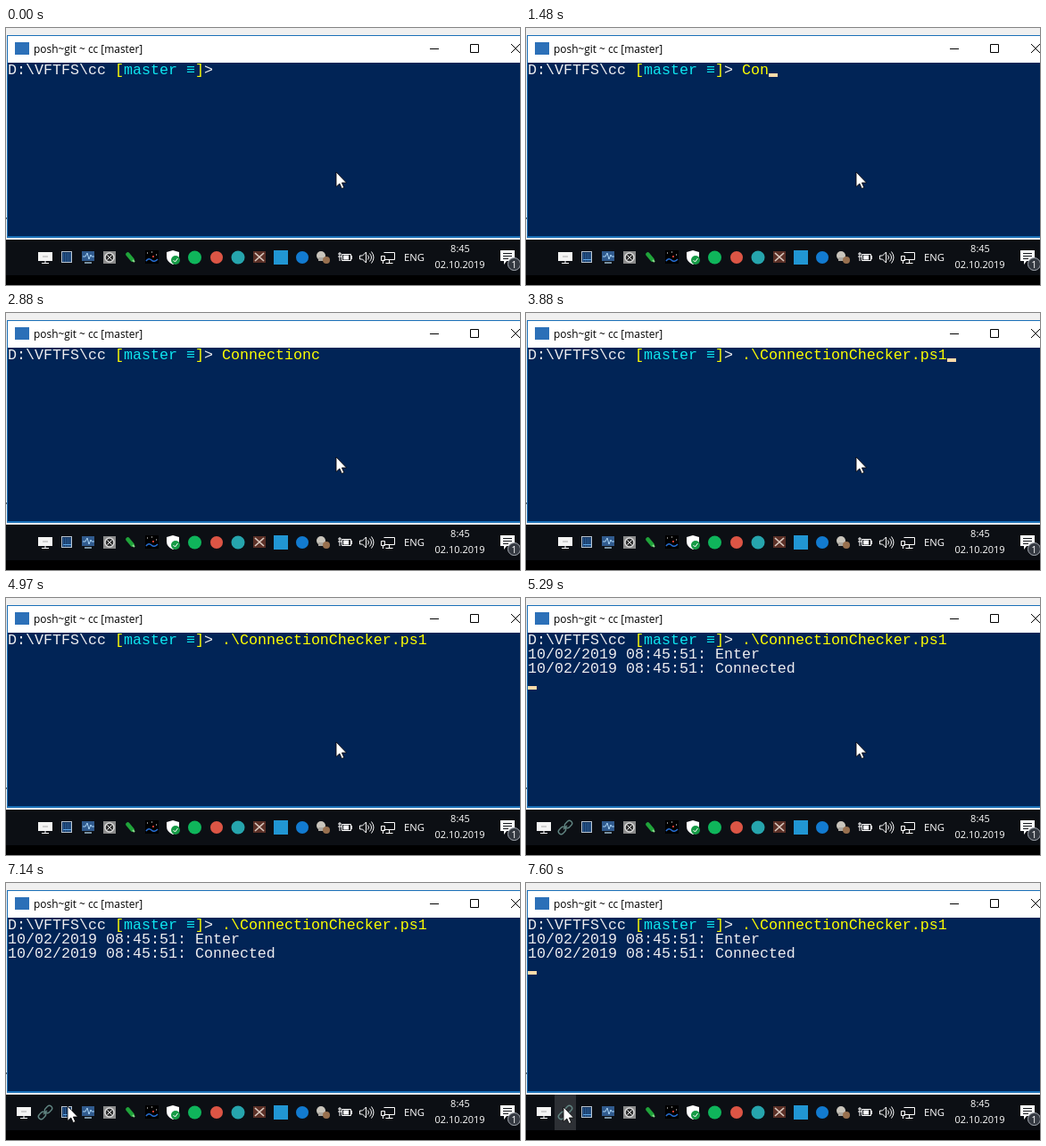
Write an HTML page that moves like this. It is 576 px wide and 289 px high and loops after 8 s.

```html
<!DOCTYPE html>
<html lang="en">
<head>
<meta charset="utf-8">
<title>Connection checker</title>
<style>
  html, body { margin: 0; width: 100%; height: 100%; overflow: hidden; background: #000; }
  svg { display: block; }
  rect { shape-rendering: crispEdges; }
  .term { font: 16.667px "Liberation Mono", monospace; fill: #eeedf0; white-space: pre; }
  .ui { font: 11px "Open Sans", sans-serif; }
  .yellow { fill: #ff0; }
  .cyan { fill: #0ee6f0; }
  .line { fill: none; stroke: #fff; }
</style>
</head>
<body>
<svg width="576" height="289" viewBox="0 0 576 289">
  <!-- window -->
  <rect width="576" height="238" fill="#f0f0f0"/>
  <rect y="213" width="1" height="2" fill="#666"/>
  <rect x="1" y="8" width="575" height="228" fill="#1a70b8"/>
  <rect x="2" y="9" width="574" height="30" fill="#fff"/>
  <rect x="2" y="39" width="574" height="195" fill="#012456"/>
  <rect x="10" y="16" width="16" height="14" fill="#2c70b8"/>
  <text class="ui" x="31" y="28" style="font-size:11.9px">posh~git ~ cc [master]</text>
  <path d="M475 23.5h10M520.5 18.5h9v9h-9zM566 18l10 10m0-10l-10 10" fill="none" stroke="#000"/>

  <!-- terminal -->
  <text class="term" x="2" y="52">D:\VFTFS\cc <tspan class="yellow">[</tspan><tspan class="cyan">master ≡</tspan><tspan class="yellow">]</tspan>&gt; <tspan class="yellow" id="command"></tspan></text>
  <text class="term" x="2" y="68" id="enter">10/02/2019 08:45:51: Enter</text>
  <text class="term" x="2" y="84" id="connected">10/02/2019 08:45:51: Connected</text>
  <rect id="caret" width="10" height="4" fill="#fedba9"/>

  <!-- taskbar -->
  <rect y="238" width="576" height="40" fill="#0c0f14"/>
  <rect id="hover" x="32" y="238" width="24" height="40" fill="#2d3035"/>
  <g id="monitor">
    <rect x="36" y="252" width="16" height="10" fill="#f4f4f4"/>
    <path d="M44 262v2m-4 .5h8" class="line"/>
    <path d="M41 257h6" stroke="#aaa"/>
  </g>
  <g id="chain" fill="none" stroke="#628683" stroke-width="1.4" transform="rotate(-45 44 258)">
    <rect x="34.5" y="255" width="9" height="6" rx="3" style="shape-rendering:auto"/>
    <rect x="44.5" y="255" width="9" height="6" rx="3" style="shape-rendering:auto"/>
    <path d="M41 258h6"/>
  </g>
  <rect x="62.5" y="251.5" width="11" height="12" fill="#12335f" stroke="#b8c4d0"/>
  <path d="M64 254h9m-9 2h9m-9 2h9m-9 2h9m-9 2h9" stroke="#4a88c8" stroke-dasharray="1 1"/>
  <path id="load" d="M64 260.5h9" stroke="#5fa8e8"/>
  <rect x="85" y="251" width="14" height="11" fill="#315b8e"/>
  <path d="M86 257h3l2-4 2 7 2-5 1 2h3" fill="none" stroke="#a9d4f5"/>
  <path d="M88 264h8" stroke="#78909f" stroke-width="2"/>
  <rect x="109" y="251" width="14" height="14" fill="#8a8a8a"/>
  <circle cx="116" cy="258" r="5" fill="#333" stroke="#ddd" stroke-width="1.5"/>
  <path d="M113.500 255.500l5 5m0-5l-5 5" class="line"/>
  <path d="M136.500 254.500l5 6" stroke="#20a33a" stroke-width="4.500" stroke-linecap="round"/>
  <path d="M142 261l2 2" stroke="#8bd88c" stroke-width="2"/>
  <rect x="156" y="250" width="15" height="15" fill="#000"/>
  <path d="M157 262q3-4 6-1t7-1" fill="none" stroke="#276fd5" stroke-width="1.600"/>
  <path d="M158 253h1m4-1h1m4 3h1" stroke="#fff"/>
  <path d="M164 257h2" stroke="#d43a30" stroke-width="2"/>
  <path d="M187 250l7 2v5q0 6-7 9-7-3-7-9v-5z" fill="#fff"/>
  <circle cx="190" cy="261" r="5" fill="#169b46"/>
  <path d="M187.500 261l2 2 3-4" class="line"/>
  <circle cx="211.500" cy="258" r="7.500" fill="#0fb55b"/>
  <circle cx="236" cy="258" r="7" fill="#dc5545"/>
  <circle cx="260" cy="258" r="7.500" fill="#26a5ad"/>
  <rect x="277" y="251" width="14" height="13" fill="#5b3027"/>
  <path d="M279 253l10 9m0-9l-10 9" stroke="#d9c8be" stroke-width="1.600"/>
  <rect x="300" y="250" width="16" height="16" fill="#2196d3"/>
  <circle cx="332" cy="258" r="7" fill="#127bd0"/>
  <circle cx="353" cy="256" r="5" fill="#c9c5bc"/>
  <rect x="350" y="258" width="9" height="4" fill="#aaa69f"/>
  <circle cx="359" cy="261" r="4" fill="#98704f"/>
  <g class="line">
    <path d="M376.500 254.500h10v7h-10zM387.500 256v4M372 254h4m-4 3h4m-2-5v10"/>
    <path d="M378 258h6" stroke-width="5"/>
    <path d="M396.500 256h3l4-4v12l-4-4h-3zM405.500 255.500q2 2.500 0 5M407.500 253.500q4 4.500 0 9M409.500 251.500q5 6.500 0 13"/>
    <path d="M423.500 252.500h12v8h-12M429.500 261v3m-4 .5h8M420.500 256.500h4v5h-4zM422.500 262v3"/>
  </g>
  <g class="ui" fill="#fff">
    <text x="446" y="262" style="font-size:11.3px">ENG</text>
    <g text-anchor="middle">
      <text x="509" y="252">8:45</text>
      <text x="508.500" y="270">02.10.2019</text>
    </g>
  </g>
  <path d="M554 250h16v12h-9l-3 4v-4h-4z" fill="#fff"/>
  <path d="M557 253.500h10m-10 3h10m-10 3h6" stroke="#14171c"/>
  <circle cx="569.500" cy="265.500" r="7" fill="#343941" stroke="#a8adb5"/>
  <text class="ui" x="569.500" y="269.500" fill="#fff" text-anchor="middle">1</text>

  <path id="mouse" d="M0 0V16.500L3.800 13 6.300 18.500 8.800 17.400 6.400 12H11.500Z" fill="#fff" stroke="#000" stroke-width=".8"/>
</svg>
<script>
  const LOOP = 8000;
  const PROMPT_END = 242;
  const TYPED = 'Connectionc', COMPLETED = '.\\ConnectionChecker.ps1';
  const keyTimes = [1170, 1250, 1480, 1650, 1730, 1810, 2120, 2270, 2350, 2500, 2820];
  const COMPLETE = 3110, RUN = 4740, ENTER = 5120, CONNECTED = 5200, TRAY = 5290, HOVER = 7290;
  // Caret turns on and off alternately; a key press shows it again
  const caretToggles = [240, 790, 1170, 1330, 1480, 1890, 2120, 2880, 3110, 3420,
    3880, 4430, 4740, 4970, 5120, 5980, 6530, 7050, 7600];
  const MOVE = 6450, MOVE_STEP = 77;
  const mousePath = [[370, 162], [352, 167], [290, 188], [200, 215], [110, 240], [72, 247],
    [71, 249], [70, 250], [70, 251], [69, 251], [69, 252], [68, 252], [52, 252], [42, 252]];

  const el = id => document.getElementById(id);
  const passed = (times, t) => times.filter(time => t >= time).length;
  const show = (id, visible) => el(id).setAttribute('visibility', visible ? 'visible' : 'hidden');
  const place = (id, x, y) => el(id).setAttribute('transform', `translate(${x} ${y})`);

  function draw(t) {
    const command = t < COMPLETE ? TYPED.slice(0, passed(keyTimes, t)) : COMPLETED;
    if (el('command').textContent !== command) el('command').textContent = command;
    show('enter', t >= ENTER);
    show('connected', t >= CONNECTED);

    const row = passed([RUN, ENTER, CONNECTED], t);
    place('caret', row ? 2 : PROMPT_END + command.length * 10, 51 + row * 16);
    show('caret', passed(caretToggles, t) % 2);

    show('chain', t >= TRAY);
    place('monitor', t >= TRAY ? -24 : 0, 0);
    show('load', passed([790, ENTER, 5750], t) % 2);
    show('hover', t >= HOVER);

    const step = Math.floor((t - MOVE) / MOVE_STEP) + 1;
    place('mouse', ...mousePath[Math.max(0, Math.min(step, mousePath.length - 1))]);
  }

  function frame() {
    draw(performance.now() % LOOP);
    requestAnimationFrame(frame);
  }
  frame();
</script>
</body>
</html>
```
